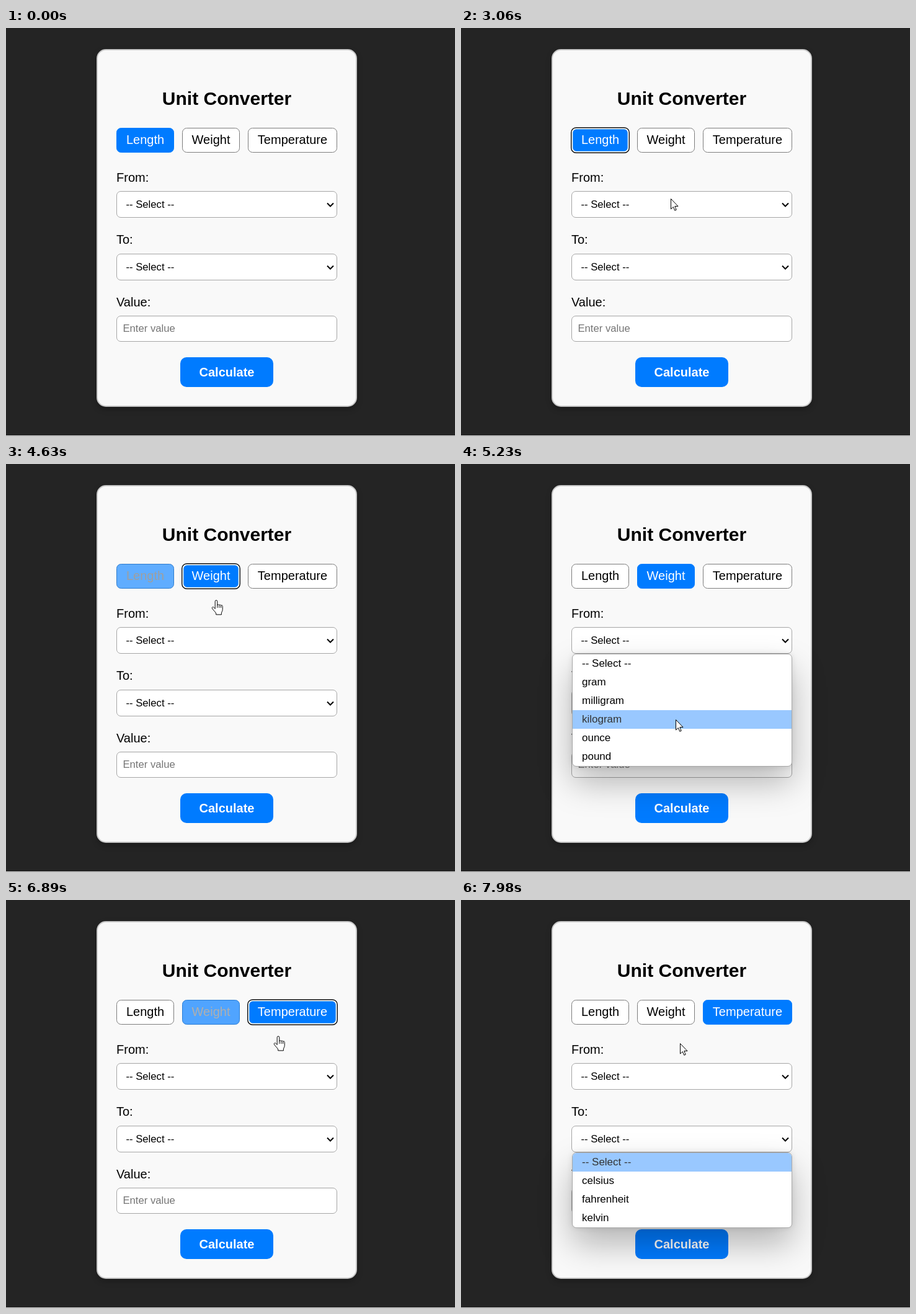
Recreate the animation shown at these times as an HTML page. Size 724 by 658 pixels, loop 8000 ms.

```html
<!DOCTYPE html>
<html lang="en">
<head>
<meta charset="utf-8">
<title>Unit Converter</title>
<style>
html, body { margin: 0; width: 100%; height: 100%; overflow: hidden; }
body { position: relative; background: #242424; font-family: "Liberation Sans", Arial, sans-serif; }
svg { position: absolute; left: 0; top: 0; }
text { font-size: 20px; }
.small { font-size: 16.67px; }
.card {
  position: absolute; left: 146px; top: 34px; width: 420px; height: 577px;
  box-sizing: border-box; border: 2px solid #c8c8c8; border-radius: 15px;
  background: #f9f9f9; box-shadow: 0 4px 10px rgba(0, 0, 0, .25);
}
.popup {
  position: absolute; left: 179px; width: 355px; box-sizing: border-box;
  border: 1px solid #a8a8a8; border-radius: 7px; overflow: hidden; background: #fff;
  box-shadow: 0 26px 54px rgba(0, 0, 0, .28), 0 0 10px rgba(0, 0, 0, .1);
}
.popup div { height: 30px; line-height: 30px; padding-left: 15px; font-size: 17px; }
.popup .on { background: #99c8ff; color: #333; }
.edge { position: absolute; left: 0; bottom: 0; width: 100%; height: 1px; background: #d0d0d0; }
</style>
</head>
<body>
<div class="edge"></div>
<div class="card"></div>
<svg width="724" height="658">
  <text x="356" y="124" text-anchor="middle" font-weight="bold" style="font-size:30px">Unit Converter</text>
  <g id="tabs"></g>
  <text x="178" y="248">From:</text>
  <text x="178" y="348">To:</text>
  <text x="178" y="449">Value:</text>
  <g fill="#fff" stroke="#a6a6a6">
    <rect x="178.5" y="263.5" width="355" height="42" rx="6.5"/>
    <rect x="178.5" y="364.5" width="355" height="42" rx="6.5"/>
    <rect x="178.5" y="464.5" width="355" height="41" rx="6.5"/>
  </g>
  <text class="small" x="193.5" y="290">-- Select --</text>
  <text class="small" x="193.5" y="391">-- Select --</text>
  <text class="small" x="188.5" y="490" fill="#757575">Enter value</text>
  <path d="M518 282.5l5 5 5-5M518 383.5l5 5 5-5" fill="none" stroke="#000" stroke-width="2"/>
  <rect x="281" y="531" width="150" height="48" rx="10" fill="#007bff"/>
  <text x="356" y="562" text-anchor="middle" font-weight="bold" fill="#fff">Calculate</text>
</svg>
<div id="popups"></div>
<svg width="724" height="658">
  <g id="cursor" fill="#fff" stroke="#000" stroke-linejoin="round">
    <path id="arrow" d="M.5 .5V17L4.3 13.5 6.8 19.3 9.2 18.3 6.8 12.5H12Z"/>
    <path id="hand" transform="translate(-7.3 .4)" d="M5.5 14V2.2a1.8 1.8 0 0 1 3.6 0V8.5c0-1.8 3-1.6 3 .2c0-1.6 2.8-1.4 2.8 .5c.3-1.3 2.6-1.1 2.6 .8V15c0 3-1.5 4-1.8 6V23.5H7V21.5C6 19 2 16 .8 13.5C-.2 11.5 2.3 10.3 3.6 12L5.5 14M9.1 8.5v4M12.1 9v3.5M14.9 9.5v3"/>
    <circle id="press" r="16" cy="1" fill="#fff03c" fill-opacity=".5" stroke="none"/>
  </g>
</svg>
<script>
const LOOP = 8000, FADE = 300, LAG = 40, HOLD = 125, HOVER = 250, ROW = 30;
const $ = id => document.getElementById(id);

const units = {
  Length: "meter kilometer millimeter centimeter inch foot yard mile",
  Weight: "gram milligram kilogram ounce pound",
  Temperature: "celsius fahrenheit kelvin"
};
const menuTop = { From: 306, To: 407 };

// Cursor stops: arrive, leave, x, y, what is clicked just before leaving
const stops = [
  [780, 780, 491, 318],
  [1160, 1160, 270, 225],
  [1540, 1870, 325, 181, "Weight"],
  [2180, 2180, 300, 318],
  [2470, 2660, 225, 184, "Length"],
  [3040, 3260, 338, 275, "From"],
  [3640, 3880, 338, 389],
  [4150, 4150, 338, 228],
  [4330, 4520, 335, 184, "Weight"],
  [4800, 4960, 346, 285, "From"],
  [5250, 5400, 346, 414],
  [5850, 5850, 348, 229],
  [6470, 6790, 457, 184, "Temperature"],
  [7170, 7350, 353, 385, "To"],
  [7510, 7740, 353, 505],
  [7980, LOOP, 353, 231]
];
const clicks = stops.filter(s => s[4]).map(s => ({ at: s[1] - 100, on: s[4] }));
clicks.forEach((c, i) => { c.end = i + 1 < clicks.length ? clicks[i + 1].at : LOOP; });
const tabClicks = clicks.filter(c => units[c.on]);

const mix = (a, b, p) => `rgb(${a.map((v, i) => Math.round(v + (b[i] - v) * p))})`;
const show = (el, on) => { el.style.visibility = on ? "visible" : "hidden"; };
const smooth = p => p * p * (3 - 2 * p);

// CSS "ease", rising early and settling slowly
function ease(x) {
  const p = Math.max(0, Math.min(1, x));
  return smooth(1 - (1 - p) ** 1.6);
}

function pointAt(t) {
  const i = stops.findIndex(s => s[0] > t);
  if (i < 1) return stops.at(i).slice(2, 4);
  const [, leave, x, y] = stops[i - 1], [arrive, , x2, y2] = stops[i];
  const p = t <= leave ? 0 : smooth((t - leave) / (arrive - leave));
  return [x + (x2 - x) * p, y + (y2 - y) * p];
}

// A tab turns blue on hover and fades once another tab's click is released
function fillAt(name, t) {
  let level = name === "Length" ? 1 : 0;
  for (const c of tabClicks) {
    const own = c.on === name;
    const start = own ? c.at - HOVER : c.at + HOLD;
    level += (own - level) * ease((t - start) / FADE);
  }
  return level;
}

const tabs = [["Length", 178, 93], ["Weight", 284, 93], ["Temperature", 390, 144]].map(([name, x, w]) => {
  const g = document.createElementNS("http://www.w3.org/2000/svg", "g");
  g.innerHTML = `<rect x="${x + .5}" y="161.5" width="${w - 1}" height="39" rx="7"/>
    <g fill="none"><rect x="${x + 1.2}" y="162.2" width="${w - 2.4}" height="37.6" rx="6.5" stroke="#fff" stroke-width="2.2"/>
    <rect x="${x - .3}" y="160.7" width="${w + .6}" height="40.6" rx="8" stroke="#101010" stroke-width="1.4"/></g>
    <text x="${x + w / 2}" y="187" text-anchor="middle">${name}</text>`;
  $("tabs").append(g);
  const [box, ring, label] = g.children;
  return { name, x, w, box, ring, label };
});

const popups = clicks.filter(c => menuTop[c.on]).map(c => {
  const el = document.createElement("div"), top = menuTop[c.on];
  const tab = tabClicks.findLast(k => k.at < c.at).on;
  el.className = "popup";
  el.style.top = top + "px";
  el.innerHTML = ["-- Select --", ...units[tab].split(" ")].map(s => `<div>${s}</div>`).join("");
  $("popups").append(el);
  return { el, top, from: c.at, to: c.end === LOOP ? LOOP : c.end - 100 };
});

function draw(t) {
  const [x, y] = pointAt(t), [px, py] = pointAt(t - LAG);
  const last = clicks.findLast(c => c.at <= t);

  for (const tab of tabs) {
    const p = fillAt(tab.name, t);
    tab.box.setAttribute("fill", mix([255, 255, 255], [0, 123, 255], p));
    tab.box.setAttribute("stroke", mix([125, 125, 125], [0, 123, 255], p));
    tab.label.setAttribute("fill", mix([0, 0, 0], [255, 255, 255], p));
    show(tab.ring, last && last.on === tab.name);
  }

  for (const p of popups) {
    show(p.el, t >= p.from && t < p.to);
    const rows = [...p.el.children];
    const hot = Math.max(0, Math.min(rows.length - 1, Math.floor((py - p.top - 1) / ROW)));
    rows.forEach((row, i) => row.classList.toggle("on", i === hot));
  }

  const seen = t >= stops[0][0];
  const onTab = py >= 161 && py < 201 && tabs.some(b => px >= b.x && px < b.x + b.w);
  $("cursor").setAttribute("transform", `translate(${Math.round(x)} ${Math.round(y)})`);
  show($("hand"), seen && onTab);
  show($("arrow"), seen && !onTab);
  show($("press"), last && t < last.at + HOLD);
}

const began = performance.now();
function tick() {
  draw((performance.now() - began) % LOOP);
  requestAnimationFrame(tick);
}
tick();
</script>
</body>
</html>
```
